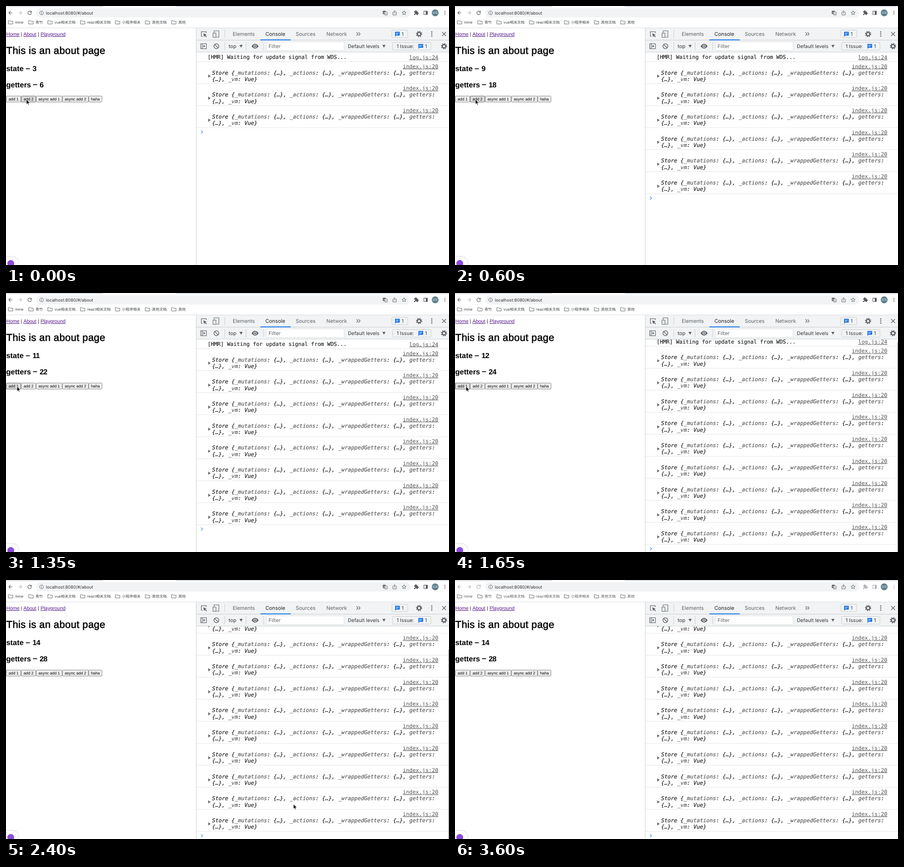
An HTML page for the animation above (3620 ms loop, 977 by 573 pixels).

```html
<!DOCTYPE html>
<html lang="zh">
<head>
<meta charset="utf-8">
<title>About page</title>
<style>
html, body { margin: 0; width: 100%; height: 100%; overflow: hidden; background: #fff; }
svg { display: block; }
text { white-space: pre; text-rendering: geometricPrecision; }
.ui { font-family: Inter, "Noto Sans CJK SC", "Noto Sans CJK", sans-serif; }
.page { font-family: "Liberation Sans", Arial, sans-serif; }
.mono { font-family: "DejaVu Sans Mono", monospace; font-size: 11.85px; stroke-width: .2px; }
</style>
</head>
<body>
<svg id="stage" width="977" height="573" viewBox="0 0 977 573"></svg>
<script>
const NS = 'http://www.w3.org/2000/svg';
const stage = document.getElementById('stage');
const INK = '#5f6368', TEXT = '#333639', LINE = '#cacdd1', BLUE = '#1a73e8';

function add(parent, tag, attrs, text) {
  const el = document.createElementNS(NS, tag);
  for (const k in attrs) el.setAttribute(k, attrs[k]);
  if (text !== undefined) el.textContent = text;
  parent.appendChild(el);
  return el;
}
const group = (parent, attrs = {}) => add(parent, 'g', attrs);
const rect = (p, x, y, width, height, fill, more) => add(p, 'rect', { x, y, width, height, fill, ...more });
const disc = (p, cx, cy, r, fill, more) => add(p, 'circle', { cx, cy, r, fill, ...more });
const label = (p, x, y, size, fill, str, more) => add(p, 'text', { x, y, 'font-size': size, fill, ...more }, str);
const stroke = (p, d, color = INK, w = 1.2, more) =>
  add(p, 'path', { d, fill: 'none', stroke: color, 'stroke-width': w, ...more });
const fillPath = (p, d, fill) => add(p, 'path', { d, fill });

function gear(p, x, y) {
  disc(p, x, y, 5.6, 'none', { stroke: INK, 'stroke-width': 2.4, 'stroke-dasharray': '2.2 2.2' });
  disc(p, x, y, 3.8, 'none', { stroke: INK, 'stroke-width': 2.6 });
}
function dots(p, x, y, gap, r, color) {
  for (let i = -1; i < 2; i++) disc(p, x, y + i * gap, r, color);
}
function bubble(p, x, y) {
  fillPath(p, `M${x} ${y}h10.5v8.5h-8l-2.5 2.5z`, BLUE);
  stroke(p, `M${x + 2} ${y + 3}h6.5M${x + 2} ${y + 5.6}h4.5`, '#fff', 1);
}

rect(stage, 0, 0, 977, 573, '#fff');

// Browser bar
rect(stage, 0, 0, 977, 2.5, '#dee1e6');
fillPath(stage, 'M211 2.5q3 0 3-2.5H374q0 2.5 3 2.5z', '#fff');
rect(stage, 67, 5, 825, 20.5, '#f1f3f4', { rx: 10.2 });
const bar = group(stage);
const nav = group(bar, { stroke: '#54585c', fill: 'none', 'stroke-width': 1.2 });
add(nav, 'path', { d: 'M14 15H6.3M10 11.2L6.3 15L10 18.8' });
stroke(bar, 'M27 15h7.7M31 11.2L34.7 15L31 18.8', '#b6b9bd', 1.2);
add(nav, 'path', { d: 'M55.4 12.6A4 4 0 1 0 56.2 16' });
const solid = group(bar, { fill: '#54585c' });
add(solid, 'path', { d: 'M56.6 10.6v4h-4z' });
add(solid, 'path', { d: 'M900 12h2.4a1.7 1.7 0 1 1 3 0h2.6v2.6a1.7 1.7 0 1 1 0 3.1v2.3h-2.4a1.6 1.6 0 1 0-3 0H900v-2.6a1.6 1.6 0 1 0 0-2.9z' });
add(solid, 'path', { d: 'M921 10.8h9v8.8h-9zM922.2 12v6.4h3.6V12z', 'fill-rule': 'evenodd' });
dots(solid, 968, 15, 3.2, 1, 'inherit');

disc(stage, 78.5, 15.2, 4.2, 'none', { stroke: INK });
stroke(stage, 'M78.5 14.6v3M78.5 12.4v1.1', INK, 1.1);
label(stage, 88, 18.5, 9.4, '#303337', 'localhost:8080/#/about', { class: 'ui' });

rect(stage, 831, 10.5, 6.5, 7.5, INK, { rx: 1 });
label(stage, 832.1, 16.6, 6, '#fff', 'A', { class: 'ui' });
rect(stage, 835, 13, 6, 7, '#fff', { rx: 1, stroke: INK, 'stroke-width': .9 });
label(stage, 835.6, 18.6, 5, INK, '文', { class: 'ui' });
stroke(stage, 'M855 13.8h-1.8v6h7.6v-6H859M857 17v-6.5M854.9 12.4L857 10.3L859.1 12.4', INK, 1);
stroke(stage, 'M878 10.6l1.3 3 3.2.3-2.4 2.1.7 3.2-2.8-1.7-2.8 1.7.7-3.2-2.4-2.1 3.2-.3z', INK, 1);
disc(stage, 946.5, 15.2, 7.6, '#5d7f8e');
label(stage, 946.5, 17.4, 6, '#eef3f5', '云石', { class: 'ui', 'text-anchor': 'middle' });

const marks = group(bar, { class: 'ui', fill: '#3c4043', stroke: 'none' });
[[5, 'mine'], [50, '青竹'], [92, 'vue相关文档'], [164, 'react相关文档'],
 [241, '小程序相关'], [307, '其他文档'], [365, '其他']].forEach(([x, name]) => {
  stroke(marks, `M${x + .2} 32.5h3.4l1.2 1.3h5.2v6h-9.8z`, INK, 1);
  add(marks, 'text', { x: x + 15, y: 39.2, 'font-size': 8.1 }, name);
});
rect(stage, 0, 48, 977, 1, '#dadce0');

// Page
const page = group(stage, { class: 'page' });
[[.8, 'Home'], [38.4, 'About'], [76.2, 'Playground']].forEach(([x, name]) =>
  label(page, x, 66, 10.9, '#551a8b', name, { 'text-decoration': 'underline' }));
for (const x of [32.5, 70]) label(page, x, 66, 10.9, '#222', '|');
label(page, .6, 106, 22.2, '#000', 'This is an about page',
  { stroke: '#000', 'stroke-width': .6, 'letter-spacing': .3 });
function heading(y, name, dashX, numX) {
  const bold = { 'font-weight': 700 };
  label(page, .5, y, 16.4, '#000', name, bold);
  rect(page, dashX, y - 6.3, 9, 1.7, '#000');
  return label(page, numX, y, 16.2, '#000', '', { ...bold, 'letter-spacing': -.7 });
}
const stateNum = heading(144.3, 'state', 43.7, 58.4);
const getterNum = heading(179.6, 'getters', 59.6, 74.2);

const buttons = [[0, 33, 'add 1'], [33, 66, 'add 2'], [66, 124, 'async add 1'],
  [124, 182, 'async add 2'], [182, 212, 'haha']].map(([a, b, name]) => {
  const box = rect(page, a + .7, 199.2, b - a - 1, 13.3, '#efefef', { rx: 1.5, stroke: '#767676', 'stroke-width': .9 });
  label(page, (a + b) / 2 + .2, 208.8, 8.8, '#000', name, { 'text-anchor': 'middle' });
  return box;
});

// Floating badge
rect(stage, -30, 553, 59, 32, '#e6e6e8', { rx: 15 });
rect(stage, -30, 554.5, 57.5, 32, '#fff', { rx: 14 });
disc(stage, 10.5, 569.5, 7.5, '#8a4be0');

// Console messages
const clip = add(add(stage, 'defs', {}), 'clipPath', { id: 'view' });
rect(clip, 420, 102, 557, 471, '#fff');
const view = group(stage, { 'clip-path': 'url(#view)' });
const list = group(view, { class: 'mono' });
const PITCH = 48.7, TOP = 123;
const tint = color => ({ fill: color, stroke: color });
const link = (p, y, str) => add(p, 'text',
  { x: 953.5, y, fill: '#545454', 'text-anchor': 'end', 'text-decoration': 'underline' }, str);
const ruler = (p, y) => rect(p, 420, y - .5, 557, 1, '#e6e6e6');

add(list, 'text', { x: 444.7, y: 117.3, ...tint('#222') }, '[HMR] Waiting for update signal from WDS...');
link(list, 117.5, 'log.js:24');
ruler(list, TOP);

function rich(p, y, parts) {
  const t = add(p, 'text', { x: 454.5, y, 'font-style': 'italic' });
  parts.forEach((s, i) => add(t, 'tspan', tint(i % 2 ? '#565656' : '#1c1c1c'), s));
}
const rows = Array.from({ length: 10 }, (_, i) => {
  const g = group(list, { transform: `translate(0 ${TOP + i * PITCH})` });
  link(g, 14.6, 'index.js:20');
  rich(g, 28.5, ['Store {', '_mutations', ': {…}, ', '_actions', ': {…}, ', '_wrappedGetters', ': {…}, ', 'getters', ':']);
  rich(g, 42.9, ['{…}, ', '_vm', ': Vue}']);
  fillPath(g, 'M446 28.6l5.4 3.6-5.4 3.6z', '#6e6e6e');
  ruler(g, PITCH);
  return g;
});
const prompt = stroke(list, 'M430.3 -3.2l3.4 3.2-3.4 3.2', '#5b9bf5', 1.5);
const thumb = rect(stage, 976, 110, 1, 462, '#6f6f6f');

// Developer tools bars
rect(stage, 419, 49, 1, 524, LINE);
rect(stage, 420, 49, 557, 53, '#f1f3f4');
rect(stage, 420, 75, 557, 1, LINE);
rect(stage, 420, 101.5, 557, 1, LINE);
rect(stage, 561, 74, 67, 2, BLUE);
const tools = group(stage, { class: 'ui' });
[[500, 'Elements', INK], [572, 'Console', '#202124'], [639, 'Sources', INK], [706.5, 'Network', INK]]
  .forEach(([x, name, color]) => label(tools, x, 66, 11.3, color, name));
for (const [x, y] of [[482, 53], [482, 80], [529, 80], [567.5, 80]]) rect(tools, x, y, 1, 18, LINE);

stroke(tools, 'M434 67h-3.2V56.8h11v3', INK, 1.2);
fillPath(tools, 'M435 60.5l7.6 3-3 1.2 3.4 3.4-1.2 1.2-3.4-3.4-1.3 3z', INK);
stroke(tools, 'M459 59v-4h10.5v14h-5.5', INK, 1.1);
rect(tools, 456.5, 60, 6.5, 9.3, '#f1f3f4', { stroke: INK, 'stroke-width': 1.1 });
stroke(tools, 'M773 58.3l3.4 3.6-3.4 3.6M777.6 58.3l3.4 3.6-3.4 3.6', INK, 1.3);
rect(tools, 851, 53.5, 35, 16.5, '#f1f3f4', { rx: 2, stroke: LINE });
bubble(tools, 858, 57);
label(tools, 872.5, 66, 11, '#3c4043', '1');
gear(tools, 911, 62);
dots(tools, 939, 62, 4.6, 1.4, INK);
stroke(tools, 'M962 57.8l8.4 8.4M970.4 57.8l-8.4 8.4', INK, 1.5);

rect(tools, 429.5, 83.5, 12.5, 11, 'none', { stroke: INK, 'stroke-width': 1.2 });
stroke(tools, 'M432.8 83.5v11', INK, 1.2);
fillPath(tools, 'M435.5 86l4 3-4 3z', INK);
disc(tools, 464, 89, 5.4, 'none', { stroke: INK, 'stroke-width': 1.5 });
stroke(tools, 'M460.2 85.2l7.6 7.6', INK, 1.5);
label(tools, 491, 93, 11.1, TEXT, 'top');
fillPath(tools, 'M515 86h7l-3.5 6.2z', INK);
fillPath(tools, 'M541.5 89q7.8-10.4 15.6 0q-7.8 10.4-15.6 0z', INK);
disc(tools, 549.3, 89, 3.3, '#f1f3f4');
disc(tools, 549.3, 89, 1.9, INK);
rect(tools, 574.5, 79.5, 171, 19, '#fff', { stroke: '#dfe1e4' });
label(tools, 579, 93, 11.3, '#606468', 'Filter');
label(tools, 754, 92.8, 10.9, TEXT, 'Default levels');
fillPath(tools, 'M830 86h7l-3.5 6.2z', INK);
rect(tools, 852.5, 80.5, 84.5, 17, '#f1f3f4', { rx: 2, stroke: LINE });
label(tools, 861.5, 93, 11, TEXT, '1 Issue:');
bubble(tools, 909.5, 84);
label(tools, 924, 93, 11, TEXT, '1');
gear(tools, 966, 89);

const cursor = add(stage, 'path', {
  d: 'M0 0V10.4L2.5 8.2L4.2 11.8L5.9 11L4.3 7.5H7.6Z',
  fill: '#000', stroke: '#fff', 'stroke-width': .8
});

// Each step lists only what changes at its time
const steps = [
  { t: 0, count: 3, logs: 3, at: [45, 207], hot: 1, down: false, bar: 0, idle: false },
  { t: 150, down: true },
  { t: 300, count: 5, logs: 4, down: false },
  { t: 450, count: 7, logs: 5 },
  { t: 600, count: 9, logs: 6 },
  { t: 750, at: [34.5, 207] },
  { t: 900, at: [25.5, 207], hot: 0 },
  { t: 1050, at: [24.3, 207], down: true },
  { t: 1200, count: 10, logs: 7, down: false },
  { t: 1350, count: 11, logs: 8 },
  { t: 1650, count: 12, logs: 9, bar: .85 },
  { t: 1800, at: [35, 207] },
  { t: 1950, at: [54, 207], hot: 1 },
  { t: 2100, count: 14, logs: 10, at: [54, 206] },
  { t: 2250, at: [455, 325] },
  { t: 2400, at: [634, 496], hot: -1 },
  { t: 2550, at: [782, 535] },
  { t: 2700, at: null, bar: .35 },
  { t: 2850, bar: 0 },
  { t: 3600, idle: true }
];
const LOOP = 3620;

function draw(ms) {
  const s = Object.assign({}, ...steps.filter(e => e.t <= ms));
  stateNum.textContent = s.count;
  getterNum.textContent = s.count * 2;
  buttons.forEach((b, i) => {
    const on = i === s.hot;
    b.setAttribute('fill', !on ? '#efefef' : s.down ? '#f5f5f5' : '#dedede');
    b.setAttribute('stroke', !on ? '#767676' : s.down ? '#8d8d8d' : '#4f4f4f');
  });
  rows.forEach((r, i) => r.setAttribute('visibility', i < s.logs ? 'visible' : 'hidden'));
  const end = TOP + s.logs * PITCH;
  const scroll = Math.max(0, end - 556.1);
  list.setAttribute('transform', `translate(0 ${-scroll})`);
  prompt.setAttribute('transform', `translate(0 ${end + 9.7})`);
  const top = 105 + scroll * .9;
  thumb.setAttribute('y', top);
  thumb.setAttribute('height', 573 - top);
  thumb.setAttribute('opacity', s.bar);
  cursor.setAttribute('visibility', s.at ? 'visible' : 'hidden');
  if (s.at) cursor.setAttribute('transform', `translate(${s.at})`);
  const tone = s.idle ? '#b0b3b7' : '#54585c';
  nav.setAttribute('stroke', tone);
  solid.setAttribute('fill', tone);
  solid.querySelectorAll('circle').forEach(c => c.setAttribute('fill', tone));
  marks.setAttribute('fill', s.idle ? '#54585c' : '#3c4043');
}

const start = performance.now();
function tick() {
  draw((performance.now() - start) % LOOP);
  requestAnimationFrame(tick);
}
tick();
</script>
</body>
</html>
```
